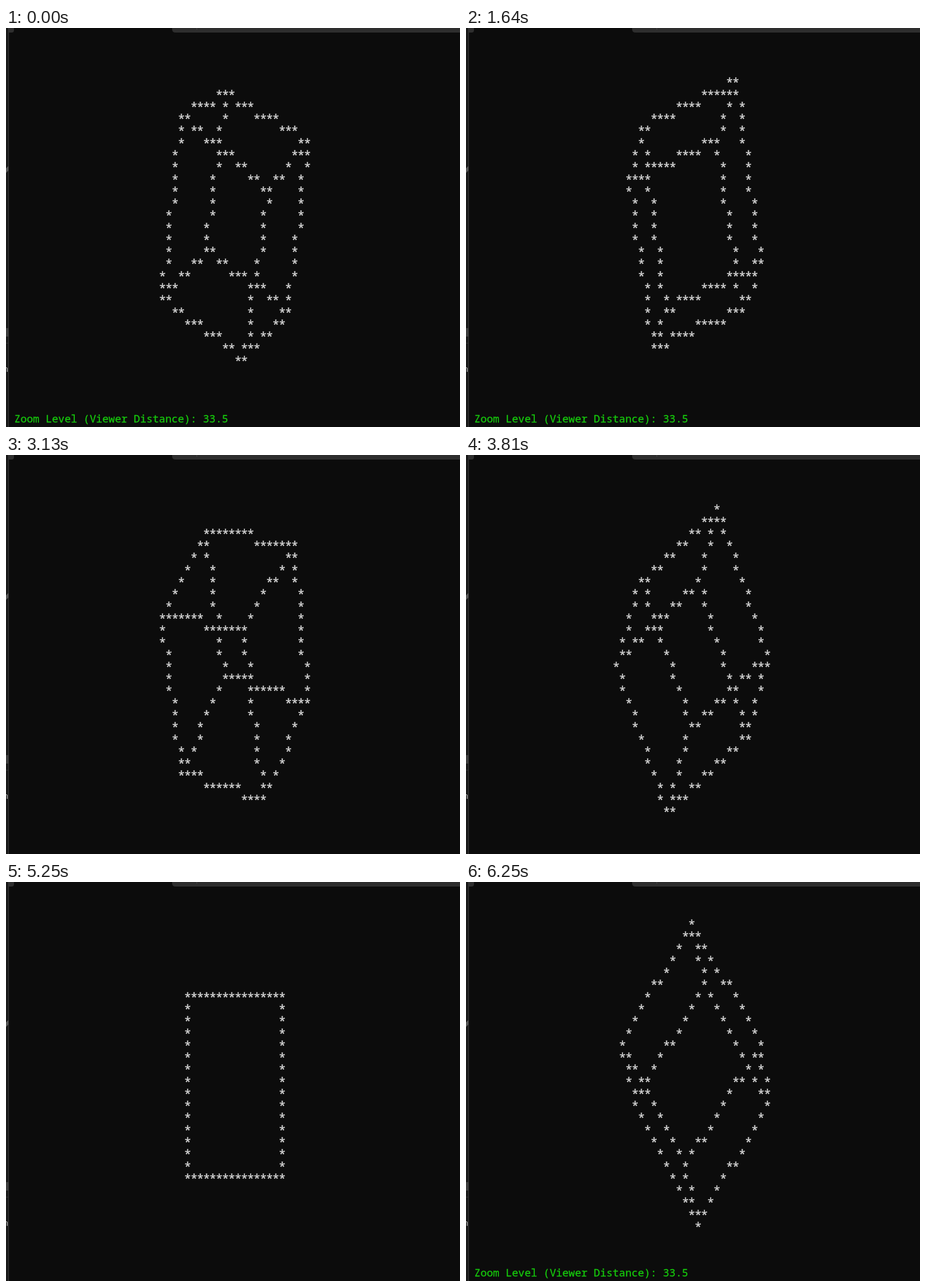
Write an HTML page with a canvas that moves like this. It is 798 by 702 pixels and loops after 6.32 s.

```html
<!DOCTYPE html>
<html lang="en">
<head>
<meta charset="utf-8">
<title>Rotating ASCII cube</title>
<style>
  html, body { margin: 0; width: 100%; height: 100%; overflow: hidden; background: #0c0c0c; }
  svg, canvas { position: absolute; left: 0; top: 0; display: block; }
  text { font-family: "Noto Sans Mono", "DejaVu Sans Mono", monospace; }
  #zoom { font-size: 18.45px; fill: #16c60c; stroke: #16c60c; stroke-width: 0.35px; white-space: pre; }
</style>
</head>
<body>
<svg width="798" height="702" viewBox="0 0 798 702">
  <!-- window behind -->
  <rect width="4" height="702" fill="#191919"/>
  <path d="M0 247 L4 243 V251 L0 255Z" fill="#565656"/>
  <rect y="528" width="4" height="15" fill="#3c3c3c"/>
  <path d="M0 554.5H4" stroke="#333"/>
  <text x="-5" y="605" font-size="15" fill="#bbb">n</text>
  <!-- terminal frame and tab strip -->
  <rect x="4" width="794" height="702" fill="#0c0c0c"/>
  <path d="M4.5 0V702" stroke="#3a3a3a"/>
  <path d="M5 0H14V4Q14 8 10 8H5Z" fill="#2e2e2e"/>
  <path d="M292 0H798V8H298Q292 8 292 2Z" fill="#2e2e2e"/>
  <path d="M335.5 0V3" stroke="#444"/>
  <text id="zoom" x="14.4" y="693.5">Zoom Level (Viewer Distance): 33.5</text>
</svg>
<canvas id="screen" width="798" height="702"></canvas>
<script>
const LOOP = 6320, TICKS = 95;
const START_ANGLE = 159.8, TURN = 1.415;   // degrees, degrees per tick
const FOV = 256, DISTANCE = 33.5;
const CELL = { x: 20.2, y: 71.1, w: 11.07, h: 21.27 };

// Corners are numbered by bits: 1 = right, 2 = top, 4 = far
const VERTICES = Array.from({ length: 8 }, (_, i) =>
  [1, 2, 4].map(bit => i & bit ? 1 : -1));
// Around each square face clockwise, then front to back
const RING = [2, 3, 1, 0];
const EDGES = RING.flatMap((a, i) => {
  const b = RING[(i + 1) % 4];
  return [[a, b], [a + 4, b + 4], [a, a + 4]];
});

const zoom = document.getElementById("zoom");
const ctx = document.getElementById("screen").getContext("2d");
ctx.font = '21px "Noto Sans Mono", "DejaVu Sans Mono", monospace';
ctx.fillStyle = ctx.strokeStyle = "#cccccc";
ctx.lineWidth = 0.5;
const box = ctx.measureText("*");
const star = {
  dx: (box.actualBoundingBoxLeft - box.actualBoundingBoxRight) / 2,
  dy: (box.actualBoundingBoxAscent - box.actualBoundingBoxDescent) / 2
};

// Turn by the same angle about x, y and z, then project to a cell
function project([x, y, z], degrees, midRow) {
  const a = degrees * Math.PI / 180, s = Math.sin(a), c = Math.cos(a);
  [y, z] = [y * c - z * s, y * s + z * c];
  [z, x] = [z * c - x * s, z * s + x * c];
  [x, y] = [x * c - y * s, x * s + y * c];
  const k = FOV / (DISTANCE + z);
  return [Math.floor(35 + x * k), Math.floor(midRow - y * k)];
}

// Bresenham line
function plotLine([x, y], [x1, y1], cells) {
  const dx = Math.abs(x1 - x), dy = Math.abs(y1 - y);
  const sx = x < x1 ? 1 : -1, sy = y < y1 ? 1 : -1;
  let err = dx - dy;
  for (;;) {
    cells.add(x + "," + y);
    if (x === x1 && y === y1) return;
    const e2 = 2 * err;
    if (e2 > -dy) { err -= dy; x += sx; }
    if (e2 < dx) { err += dx; y += sy; }
  }
}

function drawStar(col, row) {
  const x = CELL.x + col * CELL.w + star.dx, y = CELL.y + row * CELL.h + star.dy;
  ctx.fillText("*", x, y);
  ctx.strokeText("*", x, y);
}

function draw(tick) {
  // The status line flickers; printing it scrolls the cube up one row
  const printed = tick % 10 < 7;
  const degrees = Math.floor(START_ANGLE + tick * TURN);
  const points = VERTICES.map(v => project(v, degrees, printed ? 13 : 14));
  const cells = new Set();
  for (const [a, b] of EDGES) plotLine(points[a], points[b], cells);

  zoom.style.visibility = printed ? "visible" : "hidden";
  ctx.clearRect(0, 0, 798, 702);
  for (const cell of cells) drawStar(...cell.split(","));
}

const begin = performance.now();
let shown = -1;
function loop() {
  const time = (performance.now() - begin) % LOOP;
  const tick = Math.floor(time / LOOP * TICKS);
  if (tick !== shown) draw(shown = tick);
  requestAnimationFrame(loop);
}
loop();
</script>
</body>
</html>
```
